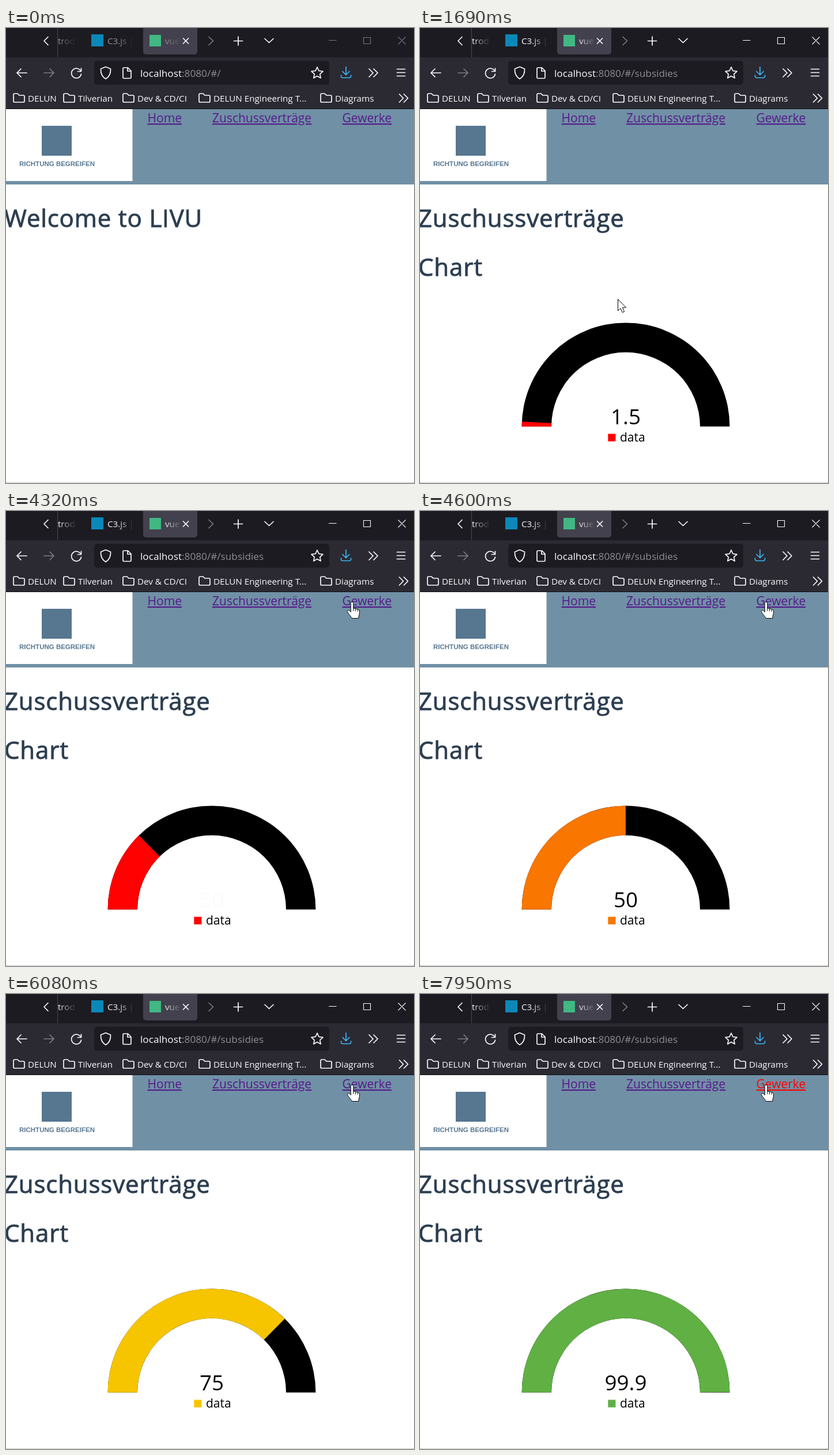
Animation of 708 by 791 pixels, one loop 8000 ms. Source, as an HTML page:

```html
<!DOCTYPE html>
<html lang="de">
<head>
<meta charset="utf-8">
<title>Zuschussverträge</title>
<style>
  html, body { margin: 0; width: 100%; height: 100%; overflow: hidden; background: #fff; }
  svg { display: block; }
  text { font-family: "Open Sans", "Noto Sans", sans-serif; white-space: pre; }
  .ui { font-size: 15.2px; fill: #fbfbfe; }
  .url { font-size: 17.2px; fill: #8f8e96; }
  .url .host { fill: #fbfbfe; }
  .icon { fill: none; stroke: #fbfbfe; stroke-width: 1.7; stroke-linecap: round; stroke-linejoin: round; }
  .thin { stroke-width: 1.1; stroke-linecap: butt; stroke-linejoin: miter; }
  .dim { stroke: #7d7c84; }
  .nav { font-size: 21px; fill: #551a8b; text-decoration: underline; }
  /* a medium weight built from the regular face */
  .title { font-size: 42px; fill: #2c3e50; stroke: #2c3e50; stroke-width: .9px; letter-spacing: .02em; }
  .tagline { font: bold 11.5px "Liberation Sans", Arial, sans-serif; fill: #577690; text-anchor: middle; }
  .value { font-size: 36.75px; text-anchor: middle; }
  .legend { font-size: 21px; }
  .inactive .win { stroke: #77767d; }
  .inactive .tab { fill: #94939a; }
</style>
</head>
<body>
<svg id="stage" width="708" height="791" viewBox="0 0 708 791">
  <defs>
    <linearGradient id="fadeBar"><stop stop-color="#1c1b22" stop-opacity="0"/><stop offset=".7" stop-color="#1c1b22"/></linearGradient>
    <linearGradient id="fadeTab"><stop stop-color="#42414d" stop-opacity="0"/><stop offset="1" stop-color="#42414d"/></linearGradient>
  </defs>
  <rect width="708" height="791" fill="#fff"/>

  <!-- tab strip -->
  <rect width="708" height="51" fill="#1c1b22"/>
  <path d="M89.5 0V51" stroke="#4b4a54"/>
  <path class="icon" d="M73 15.500L66 22.500L73 29.500"/>
  <text class="ui tab" x="90" y="28">trodu</text>
  <rect x="91" y="8" width="44" height="28" fill="url(#fadeBar)"/>
  <rect x="148" y="11" width="21" height="21" fill="#0b88b8"/>
  <text class="ui tab" x="176" y="28">C3.js |</text>
  <rect x="196" y="8" width="36" height="28" fill="url(#fadeBar)"/>
  <path d="M238 0H332V41a5 5 0 0 1 -5 5H243a5 5 0 0 1 -5 -5Z" fill="#42414d"/>
  <rect x="249" y="12" width="20" height="20" fill="#41b883"/>
  <text class="ui tab" x="276" y="28">vue</text>
  <rect x="276" y="8" width="28" height="28" fill="url(#fadeTab)"/>
  <path class="icon" d="M307.500 18L316.500 27M316.500 18L307.500 27"/>
  <path class="icon dim" d="M352 15.500L359.500 22.500L352 29.500"/>
  <path class="icon" d="M395.500 22.500H410.500M403 15V30M449 18.500L456.500 25.500L464 18.500"/>
  <path class="icon thin win" d="M560 21.500H573.500M620.500 16.500H632.500V27.500H620.500ZM680.500 15.500L693.500 28.500M693.500 15.500L680.500 28.500"/>

  <!-- toolbars -->
  <rect y="51" width="708" height="90" fill="#2b2a33"/>
  <rect y="140" width="708" height="1" fill="#0c0c0d"/>
  <rect x="153" y="57" width="408" height="41.500" rx="5" fill="#1c1b22"/>
  <path class="icon" d="M36 78H19M26 71L19 78L26 85"/>
  <path class="icon dim" d="M66 78H83M76 71L83 78L76 85"/>
  <path class="icon" d="M129.500 74.500A8.500 8.500 0 1 0 130.500 80M130.500 70V75.500H124.500"/>
  <path class="icon" d="M173 67.500L181.500 71C182 79 179.500 84.500 173 88.500C166.500 84.500 164 79 164.500 71Z"/>
  <path class="icon" d="M204.500 69H211.500L217 74.500V86a1.500 1.500 0 0 1 -1.500 1.500H204.500a1.500 1.500 0 0 1 -1.500 -1.500V70.500a1.500 1.500 0 0 1 1.500 -1.500ZM211 69.500V75H216.500"/>
  <text class="url" x="233" y="84.500"><tspan class="host">localhost</tspan><tspan id="path"></tspan></text>
  <path class="icon" id="star"/>
  <path class="icon" style="stroke:#3db8f5" d="M590 67.500V81M584 75.500L590 81.500L596 75.500M581.500 82V84a2.500 2.500 0 0 0 2.500 2.500H596a2.500 2.500 0 0 0 2.500 -2.500V82"/>
  <path class="icon" d="M630 71L637 78L630 85M638 71L645 78L638 85M678.500 71.500H692.500M678.500 77.500H692.500M678.500 83.500H692.500M682.500 115L689.500 122L682.500 129M690.500 115L697.500 122L690.500 129"/>
  <g id="bookmarks"></g>

  <!-- page -->
  <rect y="141" width="708" height="131" fill="#7090a5"/>
  <rect y="141" width="219.500" height="125" fill="#fff"/>
  <rect x="62" y="170" width="52" height="52" fill="#577690"/>
  <text class="tagline" x="88.500" y="240">RICHTUNG BEGREIFEN</text>
  <text class="nav" x="245.500" y="164">Home</text>
  <text class="nav" id="grants" x="358" y="164">Zuschussverträge</text>
  <text class="nav" id="works" x="583.500" y="164">Gewerke</text>
  <text class="title" id="title" y="345.500"></text>
  <text class="title" id="subtitle" x="-3" y="431">Chart</text>
  <g id="chart">
    <path id="track"/>
    <path id="arc"/>
    <text class="value" id="value" x="357" y="689"></text>
    <rect id="tile" x="326.300" y="705.500" width="13.100" height="13.100"/>
    <text class="legend" x="347" y="719">data</text>
  </g>
  <rect y="790" width="708" height="1" fill="#c4c4c4"/>

  <g id="cursor" fill="#fff" stroke="#000" stroke-linejoin="round">
    <path id="arrow" d="M.5 .5V20.500L5 16.500L8.300 23.500L11.500 22L8.300 15H14.500Z"/>
    <path id="hand" transform="scale(.9 1)" d="M-3 18V2.500a2.500 2.500 0 0 1 5 0V11l8 1.500q4 .8 4 4.500c0 5 -2 6.500 -2 11.500H-1c-1 -3 -4 -5 -8 -10.500q-1.500 -3 1.500 -3.500q2 0 4.500 3ZM2 11V16M6 12V16.500M10 13V17"/>
  </g>
</svg>
<script>
const LOOP = 8000, PRESS = 1080, PAGE = 1210, CHART = 1260, PRESS_AGAIN = 7880;
const FADE = 350;

// time, x, y of the pointer tip
const pointer = [
  [70, 646, 768], [200, 634, 640], [350, 570, 400], [500, 490, 205],
  [600, 456, 140], [740, 448, 148], [1490, 448, 148], [1690, 343, 470],
  [1890, 280, 621], [2290, 280, 621], [2440, 330, 535], [2600, 470, 330],
  [2760, 572, 190], [2900, 590, 167], [3040, 601, 159], [3260, 601, 158]
];
// time, value, colour
const readings = [
  [0, 1.5, [255, 0, 0]],
  [2776, 25, [255, 0, 0]],
  [4270, 50, [249, 118, 0]],
  [5775, 75, [246, 198, 0]],
  [7255, 99.9, [96, 176, 68]]
];
const links = [[245, 305], [358, 530], [583, 670]];
const folders = [
  [13, "DELUN"], [100, "Tilverian"], [203, "Dev &amp; CD/CI"],
  [335, "DELUN Engineering T..."], [546, "Diagrams"]
];

const $ = id => document.getElementById(id);
const mix = (a, b, k) => a + (b - a) * k;
const clamp = k => Math.min(1, Math.max(0, k));
const cubic = k => k < .5 ? 4 * k ** 3 : 1 - 4 * (1 - k) ** 3;
const show = (id, on) => $(id).setAttribute("visibility", on ? "visible" : "hidden");

function ring(percent) {
  const cx = 357, cy = 692.8, outer = 180.4, inner = 129;
  const a = Math.PI * (1 - percent / 100);
  const at = r => `${cx + r * Math.cos(a)} ${cy - r * Math.sin(a)}`;
  return `M${cx - outer} ${cy}A${outer} ${outer} 0 0 1 ${at(outer)}` +
    `L${at(inner)}A${inner} ${inner} 0 0 0 ${cx - inner} ${cy}Z`;
}

function starPath(cx, cy) {
  const points = Array.from({ length: 10 }, (_, i) => {
    const r = i % 2 ? 5 : 10.5, a = i * Math.PI / 5;
    return `${cx + r * Math.sin(a)} ${cy - r * Math.cos(a)}`;
  });
  return `M${points.join("L")}Z`;
}

function drawGauge(t) {
  const i = readings.findLastIndex(r => r[0] <= t);
  const [start, value, colour] = readings[i];
  const [, oldValue, oldColour] = readings[Math.max(0, i - 1)];
  const k = i ? cubic(clamp((t - start) / FADE)) : 1;
  const fill = `rgb(${colour.map((c, n) => Math.round(mix(oldColour[n], c, k)))})`;
  $("arc").setAttribute("d", ring(mix(oldValue, value, k)));
  $("arc").setAttribute("fill", fill);
  $("tile").setAttribute("fill", fill);
  $("value").textContent = value;
  $("value").setAttribute("opacity", k);
}

function pointerAt(t) {
  const i = pointer.findIndex(p => p[0] > t);
  if (i < 0) return pointer.at(-1).slice(1);
  const a = pointer[Math.max(0, i - 1)], b = pointer[i];
  const k = clamp((t - a[0]) / (b[0] - a[0]));
  return [mix(a[1], b[1], k), mix(a[2], b[2], k)];
}

function drawPointer(t) {
  const [x, y] = pointerAt(t);
  const over = y > 142 && y < 173 && links.some(([l, r]) => x >= l && x <= r);
  $("cursor").setAttribute("transform", `translate(${Math.round(x)} ${Math.round(y)})`);
  $("cursor").setAttribute("display", t < 70 ? "none" : "inline");
  show("arrow", !over);
  show("hand", over);
}

function draw(t) {
  const opened = t >= PAGE;
  $("stage").setAttribute("class", t < PRESS ? "inactive" : "");
  $("path").textContent = ":8080/#/" + (opened ? "subsidies" : "");
  $("title").textContent = opened ? "Zuschussverträge" : "Welcome to LIVU";
  $("title").setAttribute("x", -3);
  show("subtitle", opened);
  show("chart", t >= CHART);
  $("grants").style.fill = t >= PRESS && t < PAGE ? "#f00" : "";
  $("works").style.fill = t >= PRESS_AGAIN ? "#f00" : "";
  drawGauge(t);
  drawPointer(t);
}

$("track").setAttribute("d", ring(100));
$("star").setAttribute("d", starPath(540, 78.5));
$("bookmarks").innerHTML = folders.map(([x, name]) =>
  `<path class="icon" d="M${x} 116a2 2 0 0 1 2 -2h5l3 3h7a2 2 0 0 1 2 2v8a2 2 0 0 1 -2 2h-15a2 2 0 0 1 -2 -2Z"/>` +
  `<text class="ui" x="${x + 25}" y="128">${name}</text>`).join("");

const begin = performance.now();
function tick() {
  draw((performance.now() - begin) % LOOP);
  requestAnimationFrame(tick);
}
tick();
</script>
</body>
</html>
```
